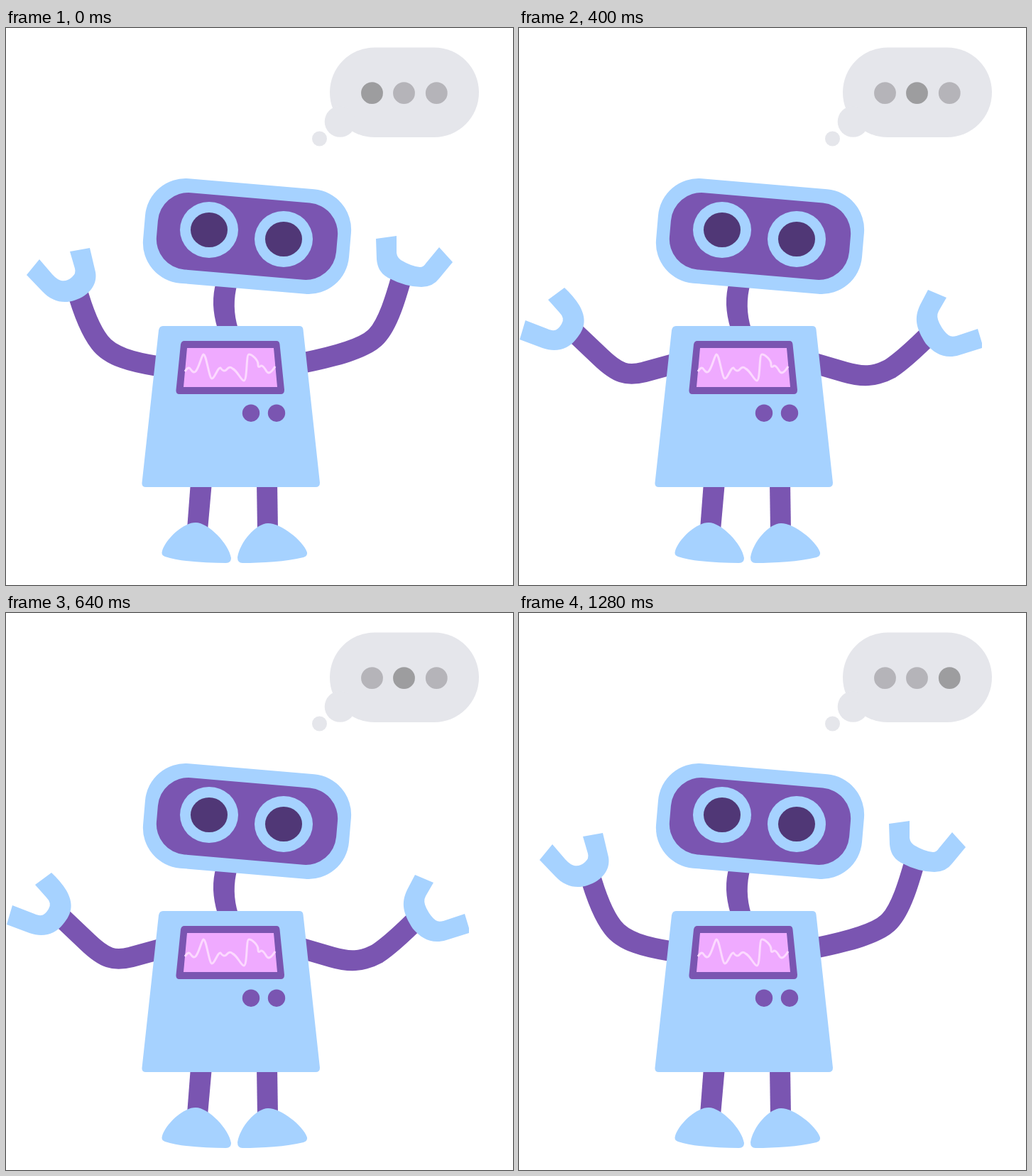
Animation, 714 px wide and 785 px high, one loop 1.6 s. Source, as an HTML page:

```html
<!DOCTYPE html>
<html lang="en">
<head>
<meta charset="utf-8">
<title>Thinking robot</title>
<style>
  html, body { margin: 0; width: 100%; height: 100%; overflow: hidden; background: #fff; }
  svg { display: block; width: 714px; height: 785px; }
  .blue { fill: #a6d2ff; }
  .purple { fill: #7a55b1; }
  .pupil { fill: #503776; }
  .bubble { fill: #e5e6eb; }
  .arm { fill: none; stroke: #7a55b1; stroke-width: 29; }
  .dot { fill: #b5b4b9; }
  .out { visibility: hidden; }
</style>
</head>
<body>
<svg viewBox="0 0 714 785">
  <g class="bubble">
    <rect x="456" y="27.5" width="210" height="126.5" rx="63"/>
    <circle cx="470.5" cy="132" r="21.8"/>
    <circle cx="441.5" cy="156" r="10.5"/>
  </g>
  <circle class="dot" cx="515.5" cy="91.7" r="15.4"/>
  <circle class="dot" cx="560.5" cy="91.7" r="15.4"/>
  <circle class="dot" cx="606.3" cy="91.7" r="15.4"/>

  <g class="up">
    <path class="arm" d="M99 366C108 398 118 425 132 443C147 463 178 471 216 477"/>
    <path class="arm" d="M558 348C549 380 538 417 522 434C506 452 462 463 418 472"/>
    <g class="blue">
      <path d="M47 326L29 348L51 371C64 385 80 389 96 384C118 377 129 361 126 344L118 310L90 315L97 339Q99 346 93 351C83 360 74 357 65 347Z"/>
      <path d="M521 297L550 293L550 313Q549 322 556 327Q571 336 583 337Q588 337 591 332L610 309L629 330L610 353Q601 365 585 365Q563 365 538 352C526 345 523 336 522 326Z"/>
    </g>
  </g>

  <g class="out">
    <path class="arm" d="M75 426L115 464C139 487 152 491 176 485L216 474"/>
    <path class="arm" d="M418 473L459 485C483 492 501 492 523 480Q544 466 580 430"/>
    <g class="blue">
      <path d="M64 366L41 383L57 401Q65 409 60 417C54 427 49 428 40 424L9 412L1 439L33 451C53 458 70 452 80 439C94 423 95 409 85 391Q77 378 64 366Z"/>
      <path d="M576 369L602 380L591 399Q587 406 592 416Q598 428 605 433Q609 436 616 434L646 424L652 444V451L620 461C600 467 585 459 573 445C559 423 556 409 565 390Z"/>
    </g>
  </g>

  <path class="purple" d="M296 358Q287 388 298 424H327Q317 392 326 360Z"/>
  <g class="purple">
    <path d="M260 640H290L284 708L255 706Z"/>
    <path d="M353 640H382L383 708H354Z"/>
  </g>
  <g class="blue">
    <path d="M220 737C224 722 248 697 267 697C285 697 314 727 317 747Q317 754 310 754C280 754 245 752 224 745Q218 743 220 737Z"/>
    <path d="M326 746C329 725 352 698 369 698C387 698 418 722 424 739Q425 744 419 746C395 752 360 754 333 754Q326 754 326 746Z"/>
    <path d="M221 420H413Q418 420 418.500 425L442 641Q442 647 436 647H197Q191 647 191.500 641L215 426Q216 420 221 420Z"/>
  </g>

  <path class="purple" d="M251 441H381Q385 441 385.500 446L392 510Q392 516 387 516H244Q239 516 239.500 510L246 446Q247 441 251 441Z"/>
  <path fill="#efaaff" d="M255 451H377L382 506H250Z"/>
  <path fill="none" stroke="#fcd9ff" stroke-width="3" stroke-linejoin="round"
    d="M252 484Q257 476 260 481Q264 487 267 484C272 479 275 462 278 460C282 459 286 494 290 494C294 494 298 478 302 479Q307 486 311 481Q315 476 319 480C326 483 331 497 335 497C340 497 338 460 342 460C347 460 355 468 355 474Q355 480 359 476Q362 475 367 484Q371 490 379 477"/>
  <circle class="purple" cx="345" cy="542.7" r="12.2"/>
  <circle class="purple" cx="381" cy="542.7" r="12.2"/>

  <g transform="translate(339.5 293.5) rotate(4.9)">
    <rect class="blue" x="-145.5" y="-74" width="291" height="148" rx="57"/>
    <rect class="purple" x="-127" y="-54.3" width="254" height="108.6" rx="43"/>
  </g>
  <g class="blue">
    <ellipse cx="286" cy="284.5" rx="41" ry="39.5"/>
    <ellipse cx="391" cy="297.5" rx="41" ry="39.5"/>
  </g>
  <g class="pupil">
    <ellipse cx="286" cy="284.5" rx="26" ry="24.5"/>
    <ellipse cx="391" cy="297.5" rx="26" ry="24.5"/>
  </g>
</svg>
<script>
  const starts = [0, 0.25, 0.5];

  // Hold one value per beat, switching without easing.
  function loop(element, property, values) {
    const frames = values.map((value, i) => ({
      [property]: value, offset: starts[i], easing: 'step-end'
    }));
    frames.push({ [property]: values[2], offset: 1 });
    const animation = element.animate(frames, { duration: 1600, iterations: Infinity });
    animation.startTime = document.timeline.currentTime;
  }

  loop(document.querySelector('.up'), 'visibility', ['visible', 'hidden', 'visible']);
  loop(document.querySelector('.out'), 'visibility', ['hidden', 'visible', 'hidden']);
  document.querySelectorAll('.dot').forEach((dot, active) =>
    loop(dot, 'fill', starts.map((_, i) => i === active ? '#9d9d9f' : '#b5b4b9')));
</script>
</body>
</html>
```
